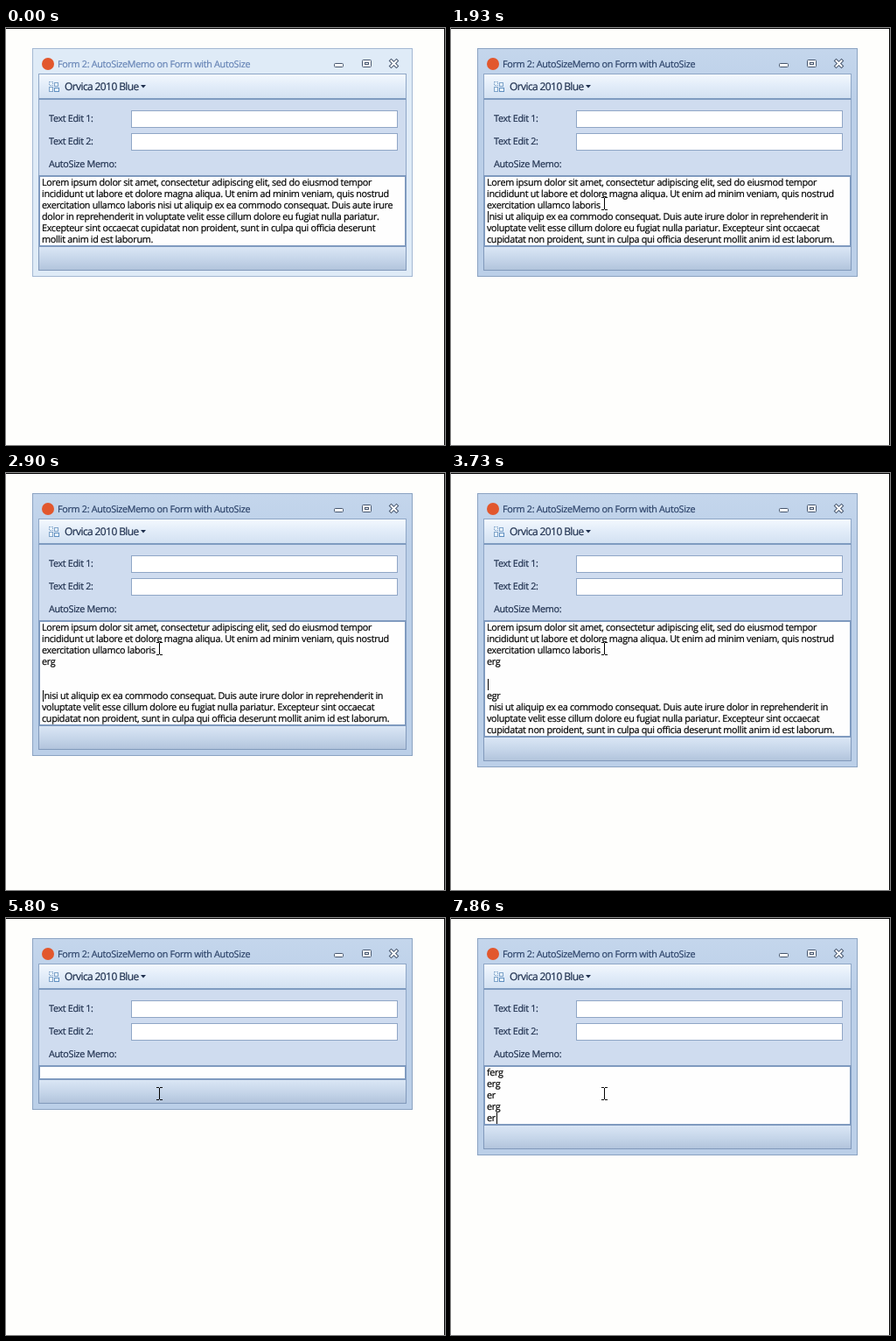
Write an HTML page that moves like this. It is 502 by 476 pixels and loops after 8 s.

```html
<!DOCTYPE html>
<html lang="en">
<head>
<meta charset="utf-8">
<title>Auto-sizing memo</title>
<style>
html, body { margin: 0; width: 100%; height: 100%; overflow: hidden; }
body { position: relative; background: #fefefc; }
#stage {
  position: absolute; left: 0; top: 0; width: 502px; height: 476px; box-sizing: border-box;
  border-top: 1px solid #000; border-right: 1px solid #000; overflow: hidden;
  font: 10.8px/13px "Open Sans", "Noto Sans", sans-serif; letter-spacing: -.31px;
  text-rendering: geometricPrecision; -webkit-text-stroke: .2px; color: #1e2f4d;
}
#win {
  position: absolute; left: 30px; top: 22px; width: 435px; box-sizing: border-box;
  padding: 0 6px 6px; border: 1px solid #a3b8d3; background: #dfebf7;
}
#win.active { border-color: #8ba3c2; background: linear-gradient(#c4d6ec, #bbcfe8 60px); }
.title { position: relative; height: 28px; color: #6583b5; }
.active .title { color: #2a4067; }
.title b { position: absolute; left: 4px; top: 10px; width: 14px; height: 14px; border-radius: 50%; background: #e2572d; }
svg { position: absolute; left: 0; top: 0; overflow: visible; }
.label { position: absolute; white-space: nowrap; }
.bar {
  position: relative; height: 30px; box-sizing: border-box; border: 1px solid #8ea6c6;
  border-bottom: 2px solid #7f9bc0; background: linear-gradient(#f3f8fe, #e3edf9 45%, #d3e1f2);
}
.bar .label { left: 29px; top: 6px; font-size: 12px; line-height: 15px; letter-spacing: -.6px; }
.panel {
  position: relative; height: 86px; box-sizing: border-box; background: #cfdcef;
  border: solid #8ea6c6; border-width: 0 1px;
}
.panel .label { left: 11px; }
.panel i {
  position: absolute; left: 105px; width: 305px; height: 20px; box-sizing: border-box;
  border: 1px solid #8fa6c6; background: #fff;
}
#memo {
  border: 2px solid #7f9abf; background: #fefefe; color: #000;
  padding-left: 3px; white-space: pre;
}
#memo div { width: fit-content; height: 13px; text-indent: -1px; }
#memo.selected div { min-width: 4px; background: #39f; color: #fff; }
.caret {
  display: inline-block; width: 1px; height: 13px; margin: 0 -2px 0 1px;
  vertical-align: top; background: #000;
}
.foot {
  height: 27px; box-sizing: border-box; border: 1px solid #8199bb; border-top: 0;
  background: linear-gradient(#dae6f5, #c5d5e9 55%, #b2c4dc);
}
</style>
</head>
<body>
<div id="stage">
  <div id="win">
    <div class="title"><b></b><span class="label" style="left:22px;top:11px">Form 2: AutoSizeMemo on Form with AutoSize</span>
      <svg width="421" height="28" fill="#fff" stroke="#46566e">
        <rect x="338.5" y="16.5" width="10" height="4" rx="1"/>
        <rect x="370.5" y="12.5" width="10" height="8" rx="1"/>
        <rect x="373.5" y="15.5" width="4" height="2"/>
        <path d="M403.5 13.5l6 6m0-6l-6 6" stroke-width="4" stroke-linecap="square"/>
        <path d="M403.5 13.5l6 6m0-6l-6 6" stroke="#fff" stroke-width="2" stroke-linecap="square"/>
      </svg>
    </div>
    <div class="bar">
      <svg width="419" height="28" fill="#e8f2fb" stroke="#7ea3c9">
        <rect x="11.5" y="8.5" width="4" height="4" stroke-dasharray="1.5 1"/>
        <rect x="17.5" y="9.5" width="4" height="4"/>
        <rect x="11.5" y="14.5" width="4" height="5"/>
        <rect x="17.5" y="15.5" width="5" height="4" stroke="#5f8fc0"/>
        <path d="M116 12h6l-3 3.5z" fill="#1e2f4d" stroke="none"/>
      </svg>
      <span class="label">Orvica 2010 Blue</span>
    </div>
    <div class="panel">
      <span class="label" style="top:15px">Text Edit 1:</span><i style="top:12px"></i>
      <span class="label" style="top:41px">Text Edit 2:</span><i style="top:38px"></i>
      <span class="label" style="top:67px">AutoSize Memo:</span>
    </div>
    <div id="memo"></div>
    <div class="foot"></div>
  </div>
  <svg id="pointer" width="1" height="1">
    <path id="arrow" d="M.5.5v16l3.7-3.5 2.5 5.5 2.3-1-2.4-5.3h5.2z" fill="#fff" stroke="#000"/>
    <path id="beam" d="M-3-6.5h3m1 0h3M.5-6v13M-3 7.5h3m1 0h3" fill="none" stroke="#000"/>
  </svg>
</div>
<script>
const LOOP = 8000;
const $ = id => document.getElementById(id);
const win = $('win'), memo = $('memo');

const opening = `Lorem ipsum dolor sit amet, consectetur adipiscing elit, sed do eiusmod tempor
incididunt ut labore et dolore magna aliqua. Ut enim ad minim veniam, quis nostrud
exercitation ullamco laboris`;
const unbroken = ` nisi ut aliquip ex ea commodo consequat. Duis aute irure
dolor in reprehenderit in voluptate velit esse cillum dolore eu fugiat nulla pariatur.
Excepteur sint occaecat cupidatat non proident, sunt in culpa qui officia deserunt
mollit anim id est laborum.`;
const rewrapped = ` nisi ut aliquip ex ea commodo consequat. Duis aute irure dolor in reprehenderit in
voluptate velit esse cillum dolore eu fugiat nulla pariatur. Excepteur sint occaecat
cupidatat non proident, sunt in culpa qui officia deserunt mollit anim id est laborum.`;

const CLICK = 1130, SELECT = 5160, CLEAR = 5700;

// Text typed after the opening; "|" marks the caret.
const edits = [
  [0, ''], [CLICK, '|'], [1800, '\n'], [1930, '\n|'],
  [2160, '\ne|'], [2260, '\ner|'], [2330, '\nerg|'], [2430, '\nerg\n|'],
  [2730, '\nerg\n\n|'], [2830, '\nerg\n\n\n|'], [2930, '\nerg\n\n\ne|'],
  [3030, '\nerg\n\n\neg|'], [3100, '\nerg\n\n\negr|'], [3230, '\nerg\n\n\negr\n|'],
  [3560, '\nerg\n\n\n|egr\n'], [3730, '\nerg\n\n|\negr\n'],
  [4100, '\nerg\n\ne|\negr\n'], [4130, '\nerg\n\ner|\negr\n'], [4160, '\nerg\n\nerg|\negr\n'],
  [4300, '\nerg\n\nerger|\negr\n'], [4430, '\nerg\n\nerger\n|\negr\n'],
  [4600, '\nerg\n\nerger\n\n|\negr\n'], [4800, '\nerg\n\nerger\n\n\n|\negr\n'],
  [SELECT, '\nerg\n\nerger\n\n\n\negr\n'],
  [CLEAR, '|'], [5800, ''],
  [6330, 'fe|'], [6400, 'fer|'], [6500, 'ferg|'], [6560, 'ferg\n|'],
  [7000, 'ferg\ne|'], [7060, 'ferg\ner|'], [7130, 'ferg\nerg|'], [7200, 'ferg\nerg\n|'],
  [7360, 'ferg\nerg\ne|'], [7430, 'ferg\nerg\ner|'], [7500, 'ferg\nerg\ner\n|'],
  [7600, 'ferg\nerg\ner\ne|'], [7660, 'ferg\nerg\ner\ner|'],
  [7800, 'ferg\nerg\ner\nerg|'], [7830, 'ferg\nerg\ner\nerg\n|'], [7860, 'ferg\nerg\ner\nerg\ner|']
];

function memoText(time, typed) {
  if (time >= CLEAR) return typed;
  return opening + typed + (typed.includes('\n') ? rewrapped : unbroken);
}

function showEdit([time, typed]) {
  memo.innerHTML = memoText(time, typed).split('\n')
    .map(line => `<div>${line.replace('|', '<span class="caret"></span>')}</div>`).join('');
  memo.classList.toggle('selected', time === SELECT);
  win.classList.toggle('active', time >= CLICK);
}

function pointerAt(t) {
  if (t >= 1260) return [175, 200];
  if (t >= 1230) return [174, 202];
  const p = Math.min(1, Math.floor((t - 400) / 38) / 20);
  const ease = p * p * (3 - 2 * p);
  return [Math.round(250 - 78 * ease), Math.round(377 - 172 * ease)];
}

function showPointer(t) {
  const [x, y] = pointerAt(t);
  $('pointer').style.display = t < 400 ? 'none' : 'block';
  $('pointer').style.transform = `translate(${x}px, ${y - 1}px)`;
  const overMemo = y < 249;
  $('beam').style.display = overMemo ? '' : 'none';
  $('arrow').style.display = overMemo ? 'none' : '';
}

let shown;
function draw() {
  const t = performance.now() % LOOP;
  const edit = edits.findLast(([time]) => time <= t);
  if (edit !== shown) showEdit(shown = edit);
  showPointer(t);
  requestAnimationFrame(draw);
}
draw();
</script>
</body>
</html>
```
